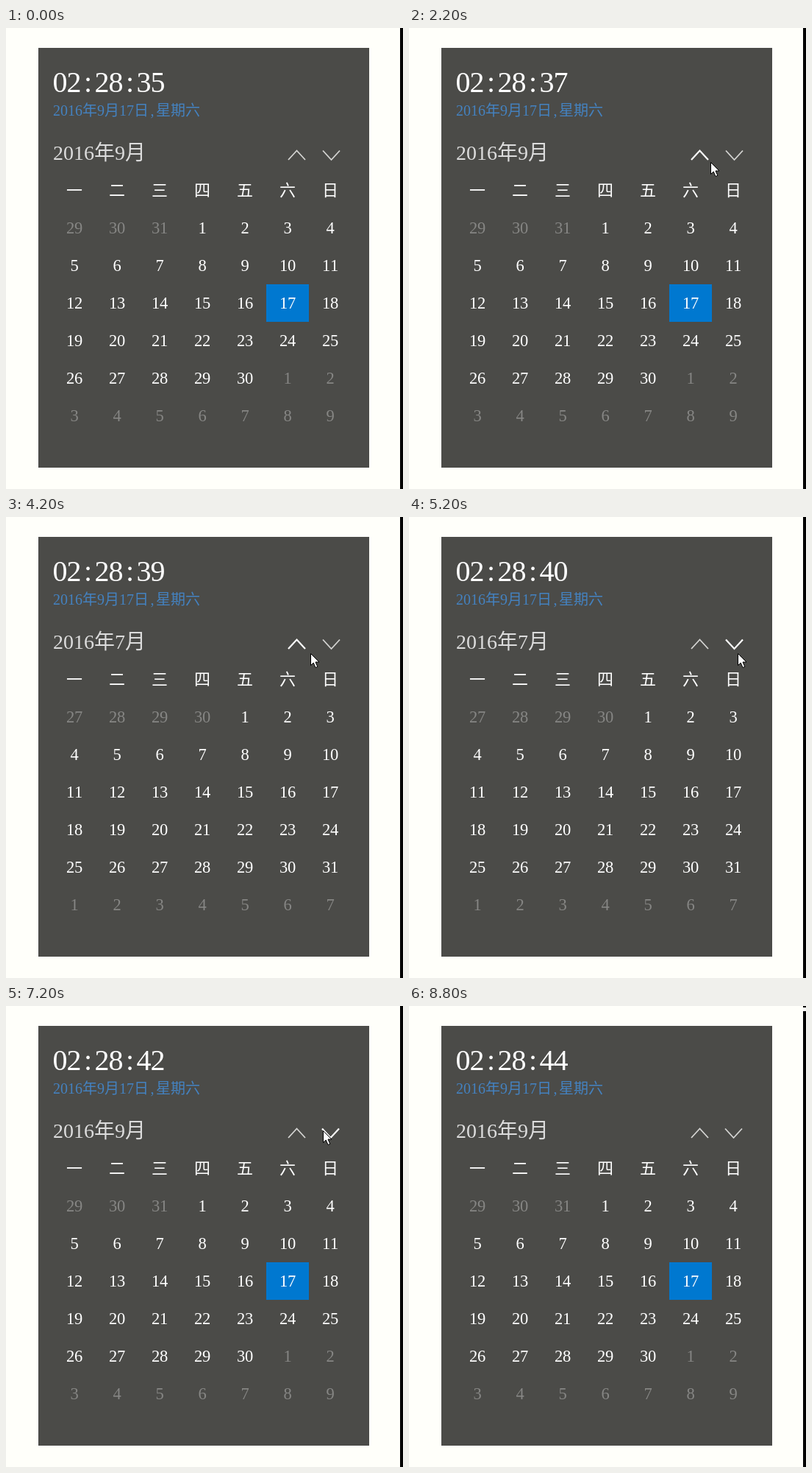
An HTML page for the animation above (9000 ms loop, 540 by 626 pixels).

```html
<!DOCTYPE html>
<html lang="zh-CN">
<head>
<meta charset="utf-8">
<title>日历</title>
<style>
  html, body { margin: 0; width: 100%; height: 100%; overflow: hidden; background: #fffffa; }
  svg { display: block; width: 540px; height: 626px; }
  text {
    font-family: "Liberation Serif", "Noto Sans CJK SC", "Noto Sans CJK", serif;
    font-weight: 300; text-anchor: middle; fill: #fff;
  }
  .date { fill: #4482c0; }
  .title { fill: #dcdcdc; }
  .dim { fill: #868684; }
  .chevron { fill: none; stroke: #d4d4d2; stroke-width: 1.8; }
  .chevron.hot { stroke: #fff; stroke-width: 2.2; }
</style>
</head>
<body>
<svg id="stage" viewBox="0 0 540 626">
  <rect width="540" height="626" fill="#fffffa"/>
  <rect x="44" y="27" width="450" height="570" fill="#4b4b48"/>
  <rect id="today" x="354" y="348" width="58" height="51" fill="#0078d0"/>
  <g id="labels"></g>
  <path id="up" class="chevron" d="M384 179L395.5 166.5L407 179"/>
  <path id="down" class="chevron" d="M431 166.5L442.5 179L454 166.5"/>
  <path id="pointer" d="M.5 .5V16.5L4.2 13L7 19.5L9.8 18.3L7 12H12Z" fill="#fff" stroke="#000"/>
  <rect x="536" width="4" height="626" fill="#000"/>
  <rect id="notch" x="536" y="2" width="4" height="5" fill="#fffffa"/>
</svg>
<script>
const LOOP = 9000, TICK = 200;
const COL = 58, ROW = 51, LEFT = 93, TOP = 272;

// [time, month]
const MONTHS = [[0, 9], [2600, 8], [3600, 7], [5800, 8], [7000, 9]];

// [time, x, y], eased between stops
const PATH = [
  [600, 560, 385], [2200, 410, 182], [3400, 410, 182], [3800, 414, 185],
  [4600, 414, 185], [5400, 453, 185], [7000, 453, 185], [8200, 150, -25]
];

// Spans in which the edge bar is shortened
const NOTCHES = [[2600, 3600], [5800, 7000], [8400, 9000]];

const $ = id => document.getElementById(id);
const labels = $('labels');

function label(size, y, cls = '') {
  const el = document.createElementNS('http://www.w3.org/2000/svg', 'text');
  el.setAttribute('font-size', size);
  el.setAttribute('y', y);
  el.setAttribute('class', cls);
  labels.append(el);
  return el;
}

// Half-width cells for digits and punctuation, double cells for hanzi
function setText(el, str, left, cell, centered = false) {
  if (el.textContent === str) return;
  const widths = [...str].map(c => c > '\u2e80' ? 2 * cell : cell);
  let x = centered ? left - widths.reduce((a, b) => a + b) / 2 : left;
  el.setAttribute('x', widths.map(w => (x += w) - w / 2).join(' '));
  el.textContent = str;
}

const clock = label(40, 87);
const title = label(28, 179, 'title');
setText(label(20, 118.5, 'date'), '2016年9月17日,星期六', 64, 10);
[...'一二三四五六日'].forEach((d, i) => setText(label(22, 228), d, LEFT + i * COL, 11, true));
const days = Array.from({ length: 42 }, (_, i) => label(22.5, TOP + 7 + Math.floor(i / 7) * ROW));

let shown = 0;
function showMonth(month) {
  if (month === shown) return;
  shown = month;
  setText(title, `2016年${month}月`, 64, 14);
  const offset = (new Date(2016, month - 1, 1).getDay() + 6) % 7;
  days.forEach((el, i) => {
    const d = new Date(2016, month - 1, 1 + i - offset);
    setText(el, String(d.getDate()), LEFT + i % 7 * COL, 11, true);
    el.setAttribute('class', d.getMonth() === month - 1 ? '' : 'dim');
  });
  $('today').style.display = month === 9 ? '' : 'none';
}

const mix = (a, b, k) => a + (b - a) * k;

function pointerAt(t) {
  const next = PATH.findIndex(p => p[0] > t);
  if (next === 0) return PATH[0].slice(1);
  if (next < 0) return PATH[PATH.length - 1].slice(1);
  const [t0, x0, y0] = PATH[next - 1], [t1, x1, y1] = PATH[next];
  const k = (t - t0) / (t1 - t0), eased = k * k * (3 - 2 * k);
  return [mix(x0, x1, eased), mix(y0, y1, eased)];
}

function render(now) {
  const t = Math.floor(now % LOOP / TICK) * TICK;
  setText(clock, '02:28:' + (35 + Math.floor((t + 200) / 1000)), 64, 19);
  showMonth(MONTHS.filter(m => m[0] <= t).pop()[1]);

  const [x, y] = pointerAt(t).map(Math.round);
  $('pointer').setAttribute('transform', `translate(${x} ${y})`);
  const over = y > 150 && y < 196;
  $('up').classList.toggle('hot', over && x > 372 && x < 420);
  $('down').classList.toggle('hot', over && x >= 420 && x < 466);
  $('down').setAttribute('transform', `translate(${t >= 7200 ? -1 : 0} 0)`);
  $('notch').style.display = NOTCHES.some(([a, b]) => t >= a && t < b) ? '' : 'none';
}

const start = performance.now();
function frame() {
  render(performance.now() - start);
  requestAnimationFrame(frame);
}
frame();
</script>
</body>
</html>
```
